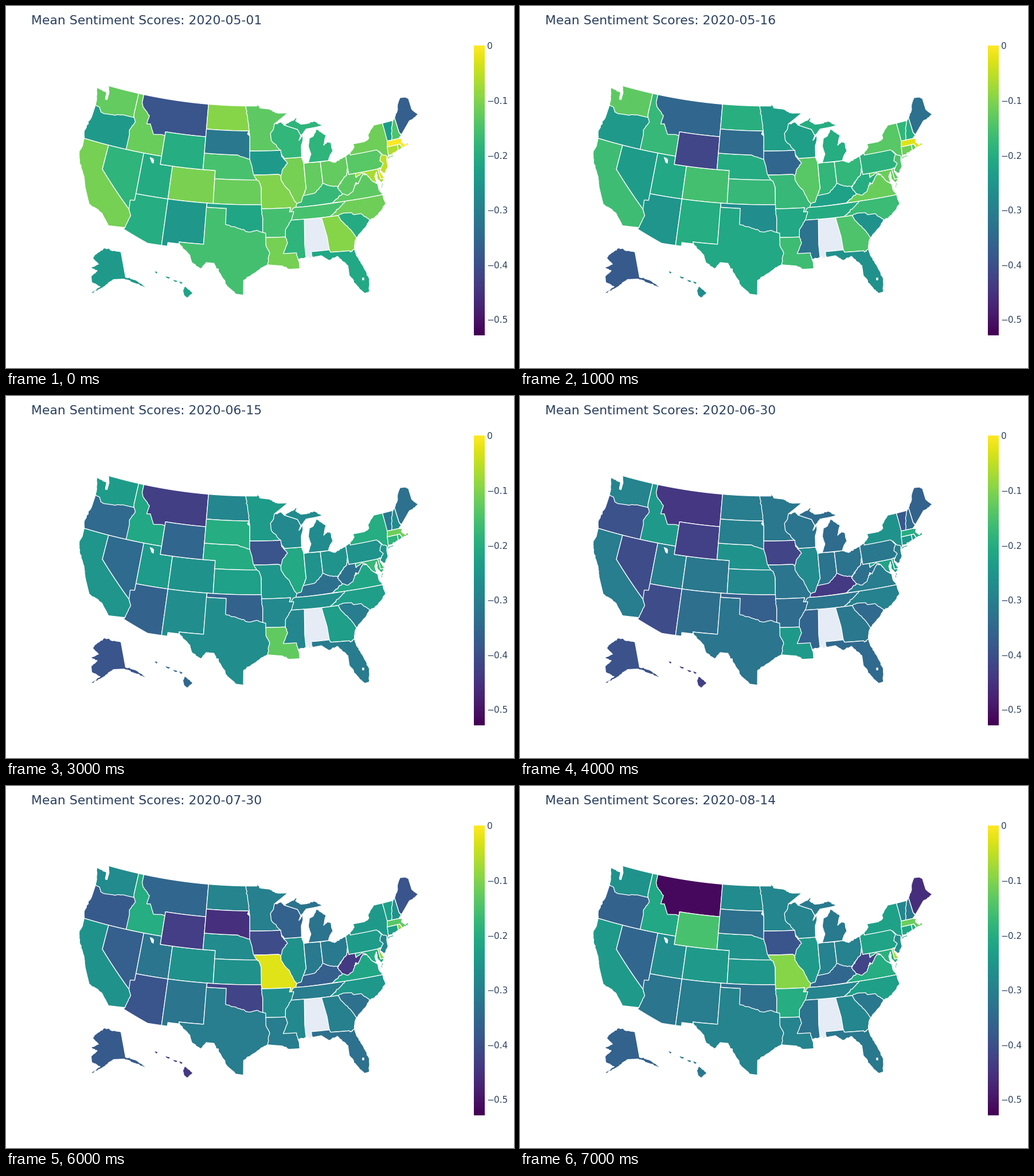
A matplotlib script for the animation above (8000 ms loop, 886 by 632 pixels).

```python
import numpy as np
import matplotlib.pyplot as plt
from matplotlib.animation import FuncAnimation
from matplotlib.patches import Polygon

W, H, DPI = 886, 632, 100
PX = 72 / DPI
INK = "#2a3f5f"
DATES = ["05-01", "05-16", "05-31", "06-15", "06-30", "07-15", "07-30", "08-14"]
SPRING = {0: 7, 1: -3, 2: -4}  # national shift by date
SUMMER = {4: -3, 6: 0, 7: 3}
CMAP = plt.get_cmap("viridis")

fig = plt.figure(figsize=(W / DPI, H / DPI), dpi=DPI, facecolor="white")
ax = fig.add_axes([0, 0, 1, 1])
ax.axis("off")

LOW, HIGH = np.sin(np.radians([29.5, 45.5]))
N = (LOW + HIGH) / 2
C = 1 - LOW ** 2 + 2 * N * LOW


def albers(ring):
    """West longitude and latitude to stage pixels."""
    west, lat = ring.T
    rho = np.sqrt(C - 2 * N * np.sin(np.radians(lat))) / N
    theta = N * np.radians(96 - west)
    return np.c_[429.7 + 820 * rho * np.sin(theta), -728.9 + 820 * rho * np.cos(theta)]


def border(a, b, limit):
    """Surveyed lines stay straight; short slanting ones wander like rivers and coasts."""
    if tuple(a) > tuple(b):
        return border(b, a, limit)[::-1]
    t = np.linspace(0, 1, 9)
    d = b - a
    line = a + np.outer(t, d)
    if np.hypot(*d) < limit and np.abs(d).min() > 0.12 * np.abs(d).max():
        rng = np.random.default_rng(int(1000 * (a + b).sum()))
        sway = 0.03 * rng.normal(size=9) * np.sin(np.pi * t)
        line = line + np.outer(sway, [-d[1], d[0]])
    return line


def outline(flat, limit=2.3):
    ring = np.reshape(flat, (-1, 2)).astype(float)
    return np.vstack([border(a, b, limit)[:-1]
                      for a, b in zip(ring, np.roll(ring, -1, axis=0))])


def shape(points, color="white", edge=1.3):
    return ax.add_patch(Polygon(points, closed=True, fc=color, ec="white",
                                lw=edge * PX, joinstyle="round"))


regions = []  # (patches, colour position per date)


def add(patches, spring, summer, events):
    """Levels follow the national shift, except for the listed events."""
    known = {k: spring + v for k, v in SPRING.items()}
    known |= {k: summer + v for k, v in SUMMER.items()}
    known |= events
    levels = np.interp(range(len(DATES)), list(known), list(known.values()))
    regions.append((patches, levels / 100))


def state(spring, summer, events, *rings):
    add([shape(albers(outline(r))) for r in rings], spring, summer, events)


def inset(spring, summer, events, *rings):
    add([shape(outline(r, 40), edge=0) for r in rings], spring, summer, events)


def box(w, e, s, n):
    return [w, n, e, n, e, s, w, s]


# Later states cover earlier ones, so each shared border is set by the later one.
# Alabama has no data
shape(albers(outline([88.6, 35.1, 85.4, 35.1, 84.9, 32, 84.9, 30.8, 87.5, 30.3, 88, 30.25,
                      88.1, 30.55, 88.4, 30.3, 88.7, 31])), "#e5ecf6", 0)
# Idaho, Oregon, Washington
state(70, 57, {6: 62},
      [117.04, 49, 116.05, 49, 116, 48, 113.5, 46.3, 113, 45.2, 111.05, 44.8, 111.05, 42,
       117.03, 42, 117.5, 44, 117.4, 45.5, 116.92, 46, 117.04, 46.43])
state(47, 28, {1: 54},
      [124, 46.28, 124.05, 44.8, 124.55, 42.84, 124.2, 42, 117.03, 42, 117.03, 43.83,
       117.2, 44.4, 116.5, 45.5, 116.92, 46, 117.1, 46.2, 123.6, 46.4])
state(69, 48, {1: 75},
      [124.72, 48.38, 122.75, 48.14, 122.6, 47.3, 122.3, 47.3, 122.3, 48.2, 122.75, 49,
       117.03, 49, 117.04, 46.43, 116.92, 46, 118.98, 46, 121.2, 45.65, 122.2, 45.55,
       122.75, 45.65, 123.2, 46.15, 124, 46.28, 124.1, 47])
# California, Nevada, Utah, Arizona
state(72, 51, {2: 62, 4: 42},
      [124.2, 42, 120, 42, 120, 39, 114.63, 35, 114, 34.2, 114.72, 32.72, 117.12, 32.53,
       118.4, 33.8, 119.2, 34.15, 120.6, 34.5, 121.9, 36.4, 122.5, 37.6, 123.75, 39,
       124.35, 40.3, 124.1, 41])
state(58, 30, {2: 46, 4: 23}, [120, 42, 114.04, 42, 114.04, 36.2, 114.63, 35, 120, 39])
state(63, 46, {0: 61, 2: 66, 6: 39},
      [114.04, 42, 111.05, 42, 111.05, 41, 109.05, 41, 109.05, 37, 114.04, 37])
state(55, 26, {2: 40, 7: 39},
      [114.05, 37, 109.05, 37, 109.05, 31.33, 111.07, 31.33, 114.81, 32.5, 114.5, 33.4,
       114.2, 34.3, 114.63, 35, 114.72, 36.1, 114.05, 36.2])
# Colorado, New Mexico, Montana, Wyoming
state(73, 51, {2: 61, 4: 40}, box(109.05, 102.05, 37, 41))
state(65, 39, {0: 53},
      [109.05, 37, 103, 37, 103.06, 32, 106.62, 32, 106.53, 31.78, 108.2, 31.78,
       108.2, 31.33, 109.05, 31.33])
state(25, 17, {0: 26, 1: 33, 4: 16, 6: 33, 7: 2},
      [116.05, 49, 104.05, 49, 104.05, 45, 111.05, 45, 111.05, 44.5, 111.6, 44.6,
       113, 44.45, 113.9, 45.65, 114.5, 45.55, 114.3, 46.6, 115.75, 47.5, 116.05, 48])
state(50, 22, {0: 62, 1: 21, 6: 18, 7: 71}, box(111.05, 104.05, 41, 45))
# Texas
state(63, 42, {},
      [103.04, 36.5, 100, 36.5, 99.5, 35, 94, 34, 93.9, 32, 93.4, 31, 93.84, 29.7,
       94.8, 29.3, 95.9, 28.6, 97.2, 27.8, 97.2, 26, 98.2, 26.1, 99.4, 27, 100.3, 28.3,
       101.4, 29.77, 102.5, 29.8, 103.15, 28.98, 104.5, 29.65, 104.9, 30.55,
       106.53, 31.78, 106.62, 32, 103.06, 32])
# Kentucky, Illinois, Wisconsin
state(60, 30, {4: 17},
      [89.42, 36.5, 89.5, 36.8, 88.8, 37.3, 87.8, 38.1, 86, 38.4, 84.8, 39.2, 82.8, 38.9,
       82.4, 38.2, 81.97, 37.54, 83.68, 36.6, 88.05, 36.5])
state(77, 51, {0: 79},
      [90.65, 42.5, 87.8, 42.5, 87.53, 41.7, 87.53, 39.35, 87.5, 38.7, 88.05, 37.85,
       88.45, 37.1, 89.15, 36.97, 89.7, 37, 90.6, 38.2, 91.2, 39.2, 91.6, 40.2, 91.3, 41.1])
state(59, 42, {6: 31},
      [92.1, 46.75, 90.9, 46.95, 90.4, 46.55, 88.1, 45.9, 87.6, 45.1, 88, 44.55,
       87.1, 45.25, 87.7, 43.8, 87.8, 42.5, 90.65, 42.5, 91.4, 43.3, 93, 44.7, 93.2, 45.6,
       92.5, 46.2, 92.4, 46.6])
# Minnesota, Iowa, Missouri
state(68, 43, {1: 56, 2: 70},
      [97.23, 49, 95.15, 49, 95.15, 49.38, 94.6, 48.75, 93, 48.6, 91.4, 48.05, 89.6, 48,
       92.1, 46.75, 92.3, 46.1, 92.85, 45.6, 92.75, 44.75, 91.22, 43.5, 96.45, 43.5,
       96.45, 45.3, 96.6, 45.94, 97, 47])
state(36, 23, {0: 54},
      [96.45, 43.5, 91.22, 43.5, 91.1, 42.75, 90.2, 41.9, 91.05, 41.2, 91.4, 40.4,
       91.73, 40.61, 95.9, 40.6, 96.2, 41.5, 96.6, 42.8])
state(70, 42, {0: 81, 6: 95, 7: 82},
      [95.77, 40.59, 91.73, 40.61, 91.4, 40.4, 91.4, 39.9, 90.7, 39, 90.2, 38.6, 89.5, 37.3,
       89.15, 36.95, 89.7, 36, 90.37, 36, 90.15, 36.5, 94.62, 36.5, 94.62, 39.1, 95.4, 40,
       95.9, 40.5])
# Nebraska, Kansas, the Dakotas, Oklahoma
state(64, 48, {2: 71, 4: 51},
      [104.05, 43, 97, 43, 96.45, 42.49, 96.1, 41.7, 95.85, 40.7, 95.3, 40, 102.05, 40,
       102.05, 41, 104.05, 41])
state(70, 50, {},
      [102.05, 40, 95.3, 40, 94.9, 39.8, 94.62, 39.1, 94.62, 37, 102.05, 37])
state(66, 45, {0: 82, 2: 50},
      [104.05, 49, 97.23, 49, 96.8, 47.2, 96.56, 45.94, 104.05, 45.94])
state(38, 34, {0: 40, 2: 81, 4: 43, 6: 14},
      [104.05, 45.94, 96.56, 45.94, 96.85, 45.6, 96.45, 45.3, 96.45, 43.5, 96.45, 42.5,
       97.9, 42.8, 98.5, 43, 104.05, 43])
state(52, 33, {2: 33, 6: 20},
      [103, 37, 94.62, 37, 94.43, 35.4, 94.48, 33.64, 95.3, 33.9, 96.6, 33.7, 98.1, 34.13,
       100, 34.56, 100, 36.5, 103, 36.5])
# Tennessee, Mississippi, Arkansas, Louisiana
state(64, 42, {},
      [90.3, 35, 84.3, 34.99, 82.3, 36, 81.68, 36.59, 88.05, 36.5, 89.5, 36.5, 89.8, 36.4,
       90.2, 35.8])
state(64, 35, {0: 65, 1: 38, 6: 47},
      [90.3, 35, 88.2, 35, 88.45, 31.9, 88.4, 30.35, 89.55, 30.2, 89.9, 30.8, 91.8, 30.8,
       91.4, 33.2, 91.2, 34.2])
state(63, 49, {4: 35, 7: 62},
      [94.62, 36.5, 90.15, 36.5, 90.37, 36, 89.7, 36, 90.1, 35.1, 91.1, 33.9, 91.17, 33,
       94.04, 33.02, 94.04, 33.55, 94.48, 33.64, 94.43, 35.4])
state(72, 42, {2: 97, 4: 54},
      [94.04, 33.02, 91.17, 33, 90.9, 32.3, 91.6, 31, 89.73, 31, 89.55, 30.2, 89.4, 29.8,
       89.4, 29.05, 90.9, 29.05, 91.8, 29.5, 93.84, 29.7, 93.55, 31.2, 94.04, 32])
# Indiana, Ohio, Michigan
state(69, 41, {},
      [87.53, 41.7, 86.8, 41.76, 84.8, 41.7, 84.8, 39.1, 85.5, 38.5, 86.3, 38, 88.05, 37.85,
       87.5, 38.7, 87.53, 39.35])
state(69, 41, {},
      [84.8, 41.7, 83.45, 41.73, 82.5, 41.4, 80.52, 41.98, 80.52, 40.64, 80.85, 39.7,
       81.75, 39.1, 82.5, 38.5, 83.7, 38.65, 84.8, 39.1])
state(65, 38, {0: 65},
      [90.4, 46.55, 88.1, 45.9, 87.6, 45.1, 86.6, 45.85, 84.75, 45.95, 83.7, 46.05,
       85, 46.7, 86.5, 46.5, 87.4, 46.5, 88.3, 46.95, 87.9, 47.4, 89.6, 46.83],
      [86.8, 41.76, 83.45, 41.73, 83.1, 42.3, 82.5, 42.8, 82.65, 43.85, 83.2, 44,
       83.9, 43.65, 83.3, 44.8, 84.8, 45.75, 85.5, 44.9, 86.2, 44.7, 86.5, 43.7,
       86.2, 42.8])
# Virginia, Maryland, West Virginia
state(80, 59, {0: 75, 4: 42},
      [83.68, 36.6, 75.9, 36.55, 76.3, 37.2, 76.3, 37.9, 77.1, 38.5, 77.72, 39.32,
       78.35, 39.45, 79.2, 38.9, 80.5, 37.8, 81.97, 37.54],
      [75.97, 37.15, 75.4, 37.9, 75.65, 37.95])
state(80, 61, {},
      [79.48, 39.72, 75.79, 39.72, 75.7, 38.46, 75.05, 38.45, 75.65, 37.95, 76.2, 38.6,
       76.1, 39.4, 76.5, 38.9, 76.4, 38.1, 77, 38.4, 77.72, 39.32, 78.4, 39.5, 79.48, 39.2])
state(65, 17, {0: 75, 2: 37, 4: 36},
      [82.6, 38.3, 81.75, 39.1, 80.85, 39.7, 80.52, 40.64, 80.52, 39.72, 79.48, 39.72,
       79.48, 39.2, 78.4, 39.62, 77.75, 39.32, 78.35, 39.4, 79.3, 38.4, 79.65, 38.6,
       80.3, 37.6, 81.2, 37.25, 81.97, 37.54])
# The Carolinas, Georgia, Florida
state(71, 53, {4: 44},
      [84.3, 34.99, 83.1, 35, 82, 34.9, 79.7, 34.6, 78.55, 33.86, 77.8, 34, 76.6, 34.7,
       75.75, 35.4, 75.9, 36.55, 81.68, 36.59, 82.5, 36.05])
state(54, 37, {},
      [83.1, 35, 82.3, 35.2, 81.05, 35.1, 80.8, 34.82, 79.65, 34.8, 78.55, 33.86,
       79.3, 33.1, 80.9, 32, 82, 33.2, 83, 34.3])
state(75, 43, {},
      [85.6, 34.98, 83.1, 35, 82.8, 34.4, 81.5, 33, 80.9, 32, 81.2, 31.6, 81.45, 30.7,
       82.05, 30.4, 82.2, 30.57, 84.86, 30.7, 85, 31, 85.1, 32.6])
state(53, 37, {},
      [87.6, 31, 85, 31, 84.86, 30.7, 82.2, 30.57, 82.05, 30.4, 81.45, 30.7, 81.3, 29.9,
       80.55, 28.3, 80.05, 26.8, 80.4, 25.2, 81, 25.13, 81.8, 26.1, 82.7, 27.6, 82.7, 28.8,
       84, 30.1, 85.2, 29.7, 86.2, 30.4, 87.5, 30.3])
# New York, Pennsylvania, Delaware, New Jersey
state(77, 54, {0: 78},
      [79.76, 42.27, 78.9, 42.85, 79, 43.27, 77, 43.27, 76.2, 43.55, 76.2, 44, 74.9, 45,
       73.35, 45, 73.2, 43.6, 73.2, 42.7, 73.4, 42, 73.6, 41, 74, 40.6, 74.5, 41.2,
       75, 41.8, 79.76, 41.9],
      [74, 40.58, 71.9, 41.05, 72.6, 40.97, 73.7, 40.87])
state(67, 55, {4: 40},
      [80.52, 41.98, 79.76, 42.27, 79.76, 42, 75.35, 42, 74.7, 41.36, 74.9, 40.9, 74.5, 40.2,
       75.3, 39.75, 75.79, 39.72, 80.52, 39.72])
state(86, 84, {0: 95, 1: 75, 4: 58},
      [75.79, 39.72, 75.4, 39.8, 75.5, 39.3, 75.05, 38.45, 75.7, 38.46])
state(75, 46, {0: 90, 2: 64},
      [74.7, 41.36, 73.9, 41, 74.1, 40.4, 74.1, 39.75, 74.9, 38.95, 75.5, 39.5, 74.75, 40.2,
       75.2, 40.65])
# Vermont, New Hampshire, Maine
state(58, 43, {0: 55, 1: 66, 4: 27, 6: 56},
      [73.35, 45, 71.4, 45, 72.2, 42.73, 73.27, 42.75, 73.3, 44])
state(65, 38, {6: 50},
      [71.5, 45, 71.08, 45.3, 70.98, 43.4, 70.75, 43, 71.3, 42.7, 72.45, 42.73, 72.05, 44.1])
state(40, 26, {0: 30, 2: 43, 4: 31, 7: 13},
      [71.08, 45.3, 70.3, 46, 70, 46.7, 69.23, 47.46, 68.3, 47.35, 67.8, 47.07, 67.8, 45.7,
       67, 44.85, 68.8, 44.4, 70.7, 43.07, 70.98, 43.4])
# Massachusetts, Connecticut, Rhode Island
state(98, 74, {0: 100, 4: 62},
      [73.27, 42.75, 71.3, 42.7, 70.75, 42.6, 71, 42.2, 70.5, 41.78, 70.1, 42, 69.95, 41.7,
       71.1, 41.5, 71.38, 42.02, 73.5, 42.05])
state(81, 56, {}, [73.5, 42.05, 71.8, 42.02, 71.85, 41.32, 73.65, 41])
state(79, 60, {6: 84}, [71.8, 42.02, 71.38, 42.02, 71.15, 41.48, 71.85, 41.32])

# Alaska and Hawaii are insets in stage pixels
inset(31, 28, {0: 54},
      [172, 423, 200, 430, 208, 474, 226, 479, 243, 491, 226, 484, 206, 476, 187, 477,
       170, 490, 147, 503, 165, 490, 150, 482, 149, 472, 160, 462, 149, 457, 162, 451,
       152, 440, 155, 435])
inset(51, 22, {6: 17, 7: 40},
      [312, 490, 325, 501, 316, 509, 311, 505, 309, 497],
      *[[x - r, y - 2, x + r, y, x + r - 2, y + 2, x - 1, y + 1]
        for x, y, r in [(305, 483, 3), (295, 480, 4), (282, 474, 4), (262, 465, 2.5)]])

# Great Salt Lake and Lake Okeechobee
shape([(251, 264), (256, 266), (258, 269), (257, 275), (254, 273)], edge=0.5)
shape(np.reshape(box(621.5, 624.5, 474, 477.5), (-1, 2)), edge=0.5)

# Colour bar
ax.imshow(np.linspace(1, 0, 256)[:, None], cmap=CMAP, aspect="auto",
          extent=(816, 835, 575, 69), interpolation="bilinear")
for k in range(6):
    label = f"\u2212{k / 10}" if k else "0"
    ax.text(838.6, 75.4 + 95.6 * k, label, color=INK, size=15.4 * PX,
            family="DejaVu Sans")
title = ax.text(44, 32, "", color=INK, size=21.9 * PX, family="DejaVu Sans")
ax.set(xlim=(0, W), ylim=(H, 0))


def draw(i):
    title.set_text(f"Mean Sentiment Scores: 2020-{DATES[i]}")
    for patches, levels in regions:
        for patch in patches:
            patch.set_facecolor(CMAP(levels[i]))
    return [title]


anim = FuncAnimation(fig, draw, frames=len(DATES), interval=1000, repeat=True)
plt.show()
```
